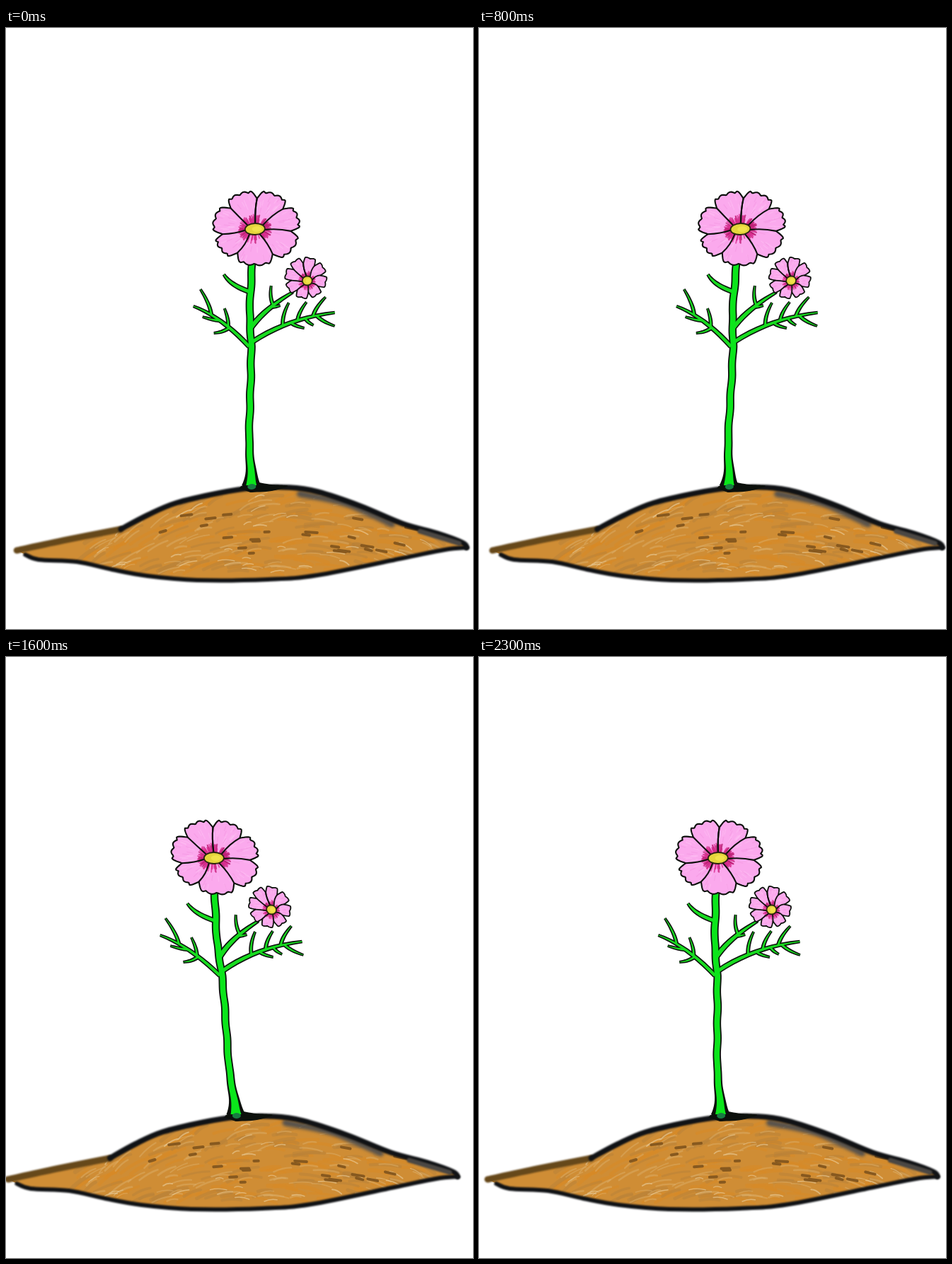
Animation of 660x849 px, one loop 2.4 s. Source, as an HTML page with a canvas:

```html
<!DOCTYPE html>
<html lang="en">
<head>
<meta charset="utf-8">
<title>Swaying flower</title>
<style>
html, body { margin: 0; width: 100%; height: 100%; overflow: hidden; background: #fff; }
canvas { display: block; }
</style>
</head>
<body>
<canvas id="stage" width="660" height="849"></canvas>
<script>
const ctx = document.getElementById('stage').getContext('2d');
const INK = '#0c100c', TAU = Math.PI * 2;

// Seeded random numbers keep the hand-drawn texture steady.
let seed = 1;
const rnd = () => (seed = seed * 16807 % 2147483647) / 2147483647;
const between = (a, b) => a + (b - a) * rnd();

// Linear value at x between [x, value] keys.
function along(keys, x) {
  const i = Math.max(1, keys.findIndex(k => k[0] >= x));
  const [x0, v0] = keys[i - 1], [x1, v1] = keys[i];
  return v0 + (v1 - v0) * (x - x0) / (x1 - x0);
}

// Smooth path through points written as "x,y x,y".
function curve(text) {
  const p = text.trim().split(/\s+/).map(s => s.split(',').map(Number));
  const at = i => p[Math.max(0, Math.min(p.length - 1, i))];
  const path = new Path2D();
  path.moveTo(...p[0]);
  for (let i = 0; i < p.length - 1; i++) {
    const [a, b, c, d] = [at(i - 1), at(i), at(i + 1), at(i + 2)];
    path.bezierCurveTo(b[0] + (c[0] - a[0]) / 6, b[1] + (c[1] - a[1]) / 6,
      c[0] - (d[0] - b[0]) / 6, c[1] - (d[1] - b[1]) / 6, c[0], c[1]);
  }
  return path;
}

function polygon(list) {
  const path = new Path2D();
  list.forEach(p => path.lineTo(...p));
  path.closePath();
  return path;
}

function stroke(path, color, width) {
  ctx.strokeStyle = color;
  ctx.lineWidth = width;
  ctx.stroke(path);
}

function fill(path, color) {
  ctx.fillStyle = color;
  ctx.fill(path);
}

function line(x, y, x2, y2, color, width) {
  const path = new Path2D();
  path.moveTo(x, y);
  path.lineTo(x2, y2);
  stroke(path, color, width);
}

function oval(x, y, rx, ry, color) {
  const path = new Path2D();
  path.ellipse(x, y, rx, ry, -.05, 0, TAU);
  fill(path, color);
  return path;
}

// ---- mound ----
const SLOPE = '15,738 85,723 162,708 ';
const RIDGE = '162,708 200,688 240,671 300,657 345,650 400,649 440,655 500,675 560,700 610,714 645,727 ';
const BELLY = '651,734 620,737 560,749 440,773 370,779 270,780 200,774 150,765 100,754 46,751 27,744';
const mound = curve(SLOPE + RIDGE + BELLY);
const ridge = curve(RIDGE + '651,734');
const belly = curve(BELLY);
const slope = curve(SLOPE);
const shade = curve('415,658 480,672 545,701');
const tipShade = curve('585,711 640,728');

function grain(count, color, len, width, alpha) {
  ctx.globalAlpha = alpha;
  for (let i = 0; i < count; i++) {
    const x = between(110, 610), y = between(660, 768);
    const a = (x - 400) / 480 + between(-.3, .15) + (y - 710) / 300;
    const l = between(.4, 1) * len, dx = Math.cos(a) * l, dy = Math.sin(a) * l;
    const path = new Path2D();
    path.moveTo(x - dx, y - dy);
    path.quadraticCurveTo(x, y - 3, x + dx, y + dy);
    stroke(path, color, width * between(.6, 1.2));
  }
  ctx.globalAlpha = 1;
}

function drawMound() {
  seed = 77;
  ctx.save();
  ctx.clip(mound);
  fill(mound, '#cf8d35');
  grain(90, '#d98a25', 22, 5, .5);
  grain(90, '#b8823a', 22, 5, .5);
  grain(110, '#dcae69', 18, 2.4, .5);
  grain(45, '#ecd0a0', 13, 1.6, .6);
  ctx.filter = 'blur(.7px)';
  for (let i = 0; i < 24; i++) {
    const x = between(220, 590), y = between(682, 742), l = between(3, 9), tilt = (x - 370) / 120;
    line(x - l, y - tilt, x + l, y + tilt, '#87591f', 4);
  }
  ctx.filter = 'blur(2px)';
  stroke(shade, '#57524c', 9);
  ctx.restore();

  ctx.save();
  ctx.filter = 'blur(1px)';
  stroke(slope, '#66481a', 9);
  stroke(ridge, '#101215', 7.5);
  stroke(tipShade, '#4a4744', 7);
  stroke(belly, '#101215', 6);
  ctx.restore();
}

// ---- stem, branches and leaves ----
const SPINE = [[334, 347], [400, 343.5], [450, 346], [490, 345.5], [580, 343], [648, 347]];

function stem(extra, flare) {
  const left = [], right = [];
  for (let y = 334; y <= 648; y += 4) {
    const x = along(SPINE, y) + Math.sin(y / 7) * .5;
    const w = 3.9 + extra + flare * Math.exp((y - 648) / 15);
    left.push([x - w, y]);
    right.unshift([x + w, y]);
  }
  return polygon(left.concat(right));
}

// Branch: start, bend, tip; leaves: place on the branch, then tip.
const branches = [
  { path: [342, 372, 316, 363, 307, 348], width: 5, leaves: [] },
  { path: [343, 450, 304, 408, 264, 393], width: 4.5,
    leaves: [[.38, 308, 396], [.36, 293, 431], [.53, 277, 408], [.68, 274, 369]] },
  { path: [345, 424, 364, 397, 405, 373], width: 6,
    leaves: [[.62, 374, 364], [.58, 387, 392]] },
  { path: [348, 443, 398, 410, 464, 402], width: 5,
    leaves: [[.4, 399, 388], [.5, 421, 424], [.58, 424, 387], [.67, 434, 420], [.76, 451, 380], [.8, 464, 421]] }
];

// Point and heading on a quadratic curve.
function onCurve([x0, y0, cx, cy, x1, y1], t) {
  const u = 1 - t;
  return {
    x: u * u * x0 + 2 * u * t * cx + t * t * x1,
    y: u * u * y0 + 2 * u * t * cy + t * t * y1,
    a: Math.atan2(u * (cy - y0) + t * (y1 - cy), u * (cx - x0) + t * (x1 - cx))
  };
}

function leafPath(branch, [t, x1, y1]) {
  const { x, y, a } = onCurve(branch, t);
  const bend = Math.hypot(x1 - x, y1 - y) * .18;
  return [x, y, (x + x1) / 2 - Math.cos(a) * bend, (y + y1) / 2 - Math.sin(a) * bend, x1, y1];
}

function taper(path, width, extra, color) {
  const left = [], right = [];
  for (let i = 0; i <= 10; i++) {
    const { x, y, a } = onCurve(path, i / 10);
    const w = width / 2 * (1 - .7 * (i / 10) ** 2) + extra;
    left.push([x - Math.sin(a) * w, y + Math.cos(a) * w]);
    right.unshift([x + Math.sin(a) * w, y - Math.cos(a) * w]);
  }
  fill(polygon(left.concat(right)), color);
}

function drawTwigs(extra, color) {
  for (const { path, width, leaves } of branches) {
    taper(path, width, extra, color);
    leaves.forEach(leaf => taper(leafPath(path, leaf), 3, extra, color));
  }
}

function drawPlant() {
  fill(curve('329,650 345,641 375,645 398,647 375,654 345,656'), INK);
  drawTwigs(1.5, INK);
  fill(stem(1.8, 9), INK);
  drawTwigs(-.1, '#18dc20');
  fill(stem(0, 4), '#0be51b');
  line(333, 649, 362, 649, INK, 4);
  oval(347, 648, 6, 4, '#187c42');
}

// ---- blossoms ----
// Folds are petal edges in degrees; depth is how far out the notches lie.
const big = { x: 353, y: 282.5, rx: 62, ry: 53, depth: .79, ink: 2.1, bumps: 4, seed: 11,
  folds: [-89, -40, 6, 62, 123, 168, 222, 271], heart: [351, 284, 14, 8] };
const small = { x: 423, y: 353, rx: 29.5, ry: 29, depth: .7, ink: 1.8, bumps: 2, seed: 29,
  folds: [...Array(9).keys()].map(i => i * 45 - 100), heart: [425, 357, 7, 6.5] };

const polar = (b, deg, r) => {
  const a = deg * Math.PI / 180;
  return [b.x + Math.cos(a) * r * b.rx, b.y + Math.sin(a) * r * b.ry];
};

function rimOf(b) {
  const list = [];
  for (let i = 0; i < b.folds.length - 1; i++) {
    const from = b.folds[i], to = b.folds[i + 1];
    for (let t = 0; t < 1; t += .03) {
      const swell = Math.min(1, Math.sin(t * Math.PI) * 1.9);
      const ruffle = .055 * (Math.abs(Math.sin(t * Math.PI * b.bumps)) - .6);
      list.push(polar(b, from + (to - from) * t, b.depth + (.98 - b.depth) * swell + ruffle * swell));
    }
  }
  return polygon(list);
}

function drawBlossom(b) {
  seed = b.seed;
  const rim = rimOf(b), [hx, hy, hx2, hy2] = b.heart, reach = b.ry * .24;
  fill(rim, '#fba9ed');
  ctx.save();
  ctx.clip(rim);
  ctx.globalAlpha = .4;
  for (let i = 0; i < 110; i++) {
    const deg = between(0, 360), r = between(.4, .85);
    line(...polar(b, deg, r), ...polar(b, deg, r + .13), i % 3 ? '#fdc3f2' : '#ef90dd', 1.4);
  }
  ctx.globalAlpha = .75;
  for (let i = 0; i < b.ry * 2.4; i++) {
    const a = between(0, TAU), l = between(.4, 1) * reach, c = Math.cos(a), s = Math.sin(a);
    line(hx + c * hx2, hy + s * hy2, hx + c * (hx2 + l * .8), hy + s * (hy2 + l),
      i % 3 ? '#d82c8f' : '#b91f72', 1.8);
  }
  ctx.restore();
  for (const deg of b.folds) {
    const a = deg * Math.PI / 180, path = new Path2D();
    path.moveTo(...polar(b, deg, b.depth));
    path.quadraticCurveTo(...polar(b, deg - 5, .5), hx + Math.cos(a) * hx2, hy + Math.sin(a) * hy2);
    stroke(path, INK, b.ink);
  }
  stroke(rim, INK, b.ink);
  stroke(oval(hx, hy, hx2, hy2, '#e5d53c'), '#2b2410', 1.8);
  oval(hx + hx2 * .2, hy, hx2 * .5, hy2 * .5, '#f1e24b');
}

// ---- sway: [step, lean] turning points ----
const SWAY = [[0, .2], [5.5, 10.2], [11, -3], [17, -15], [23, -3], [24, .2]];

function draw(step) {
  const k = along(SWAY, step) * .0076;
  ctx.setTransform(1, 0, 0, 1, 0, 0);
  ctx.fillStyle = '#fff';
  ctx.fillRect(0, 0, 660, 849);
  ctx.setTransform(1, 0, -k, 1, k * 862, 0);
  ctx.lineCap = ctx.lineJoin = 'round';
  drawMound();
  drawPlant();
  drawBlossom(big);
  drawBlossom(small);
}

const start = performance.now();
let shown = -1;
function tick() {
  const step = Math.floor((performance.now() - start) % 2400 / 100);
  if (step !== shown) draw(shown = step);
  requestAnimationFrame(tick);
}
tick();
</script>
</body>
</html>
```
